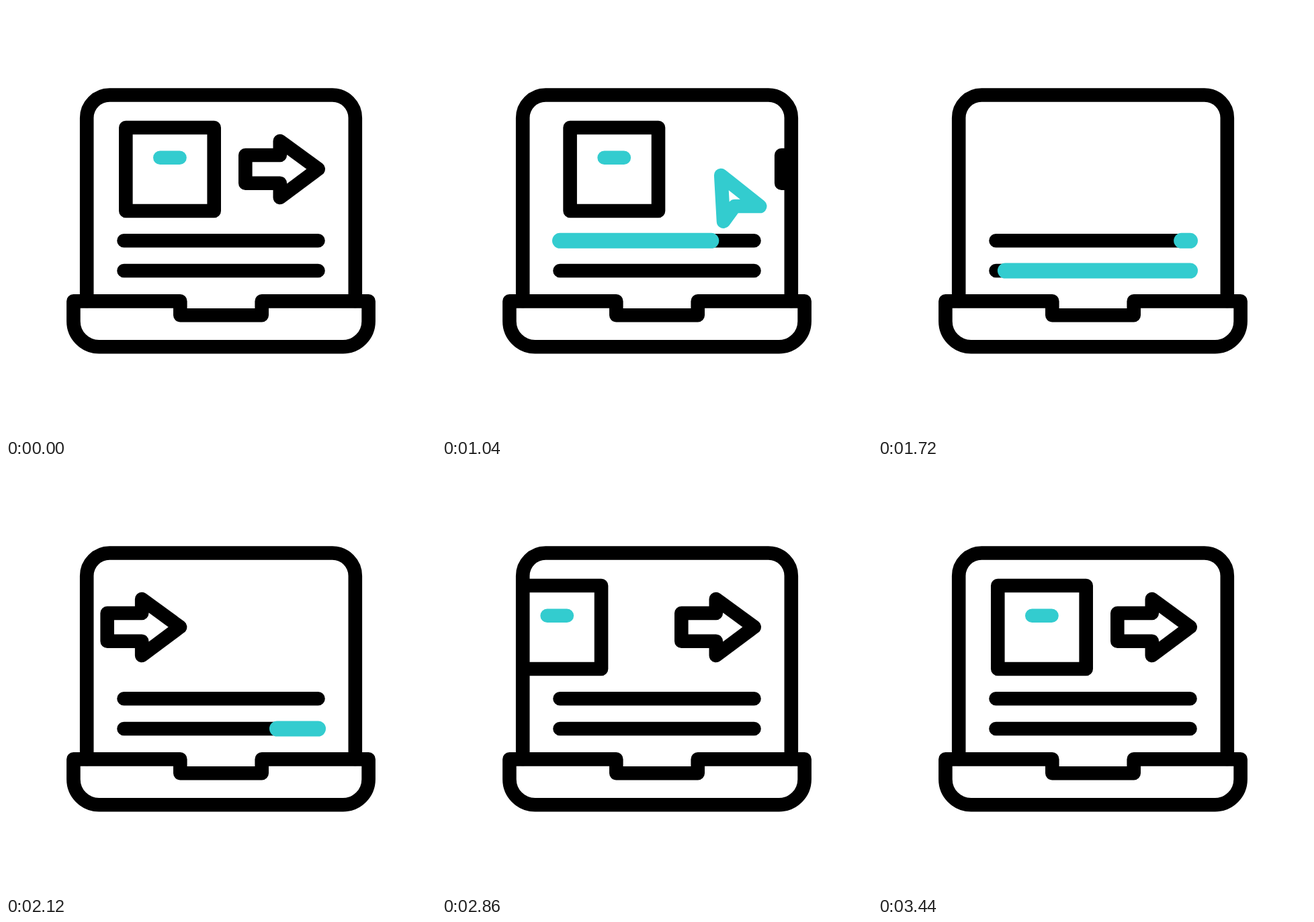
Animation, 640 px wide and 640 px high, one loop 3520 ms. Source, as an HTML page:

```html
<!DOCTYPE html>
<html lang="en">
<head>
<meta charset="utf-8">
<title>Laptop transfer</title>
<style>
  html, body { margin: 0; width: 100%; height: 100%; overflow: hidden; background: #fff; }
  svg { display: block; width: 100vw; height: 100vh; }
  path { fill: none; stroke: #000; stroke-width: 20.6; stroke-linecap: round; stroke-linejoin: round; }
  .teal { stroke: #33cccf; }
  .fill { stroke-width: 23; }
  #cursor { fill: #fff; }
</style>
</head>
<body>
<svg viewBox="0 0 640 640">
  <clipPath id="screen"><rect x="125" y="140" width="390" height="280"/></clipPath>
  <g clip-path="url(#screen)">
    <g id="square">
      <path d="M178.3 181H309.7V305H178.3Z"/>
      <path class="teal" d="M229.3 225.8H258.5"/>
    </g>
    <path id="arrow" d="M356.3 222H407.8V201L464.7 242.6L407.8 285V263.7H356.3Z"/>
  </g>
  <path d="M175.5 349.3H464.5M175.5 394H464.5"/>
  <path id="bar1" class="teal fill"/>
  <path id="bar2" class="teal fill"/>
  <path d="M120.2 439V166.5a34 34 0 0 1 34-34H485.8a34 34 0 0 1 34 34V439"/>
  <path d="M100.4 439.4H259.3V460.2H380.7V439.4H539.6V469a38 38 0 0 1-38 38.2H138.4a38 38 0 0 1-38-38.2Z"/>
  <path id="cursor" class="teal" d="M415.2 252L473.2 298H435.6L419 320.7Z"/>
</svg>
<script>
const LOOP = 3520;
const [square, arrow, bar1, bar2, cursor] =
  ['square', 'arrow', 'bar1', 'bar2', 'cursor'].map(id => document.getElementById(id));

const progress = (t, start, end) => Math.min(1, Math.max(0, (t - start) / (end - start)));
const easeInOut = p => p < .5 ? 2 * p * p : 1 - 2 * (1 - p) ** 2;

// Accelerate out to the right, then return from the left and settle.
function slide(el, t, leave, enter, enterDistance) {
  const x = t < 1700
    ? 8.4e-4 * Math.max(0, t - leave) ** 2
    : -enterDistance * (1 - progress(t, enter, enter + 960)) ** 2;
  el.setAttribute('transform', `translate(${x})`);
}

// Fill a bar from the left, then empty it the same way.
function drawBar(el, t, fill, empty) {
  const x = p => 175.5 + 289 * p;
  const from = progress(t, empty, empty + 540);
  const to = progress(t, fill, fill + 540);
  el.setAttribute('d', to > 0 && from < 1 ? `M${x(from)} 0H${x(to)}` : '');
}
bar1.setAttribute('transform', 'translate(0 349.3)');
bar2.setAttribute('transform', 'translate(0 394)');

function drawCursor(t) {
  const away = 1 - easeInOut(progress(t, 60, 440)) + easeInOut(progress(t, 1040, 1240));
  const scale = 1 - .15 * Math.sin(Math.PI * progress(t, 510, 680));
  cursor.setAttribute('transform',
    `translate(${444 + 250 * away} ${286 - 110 * away}) scale(${scale}) translate(-444 -286)`);
}

function draw(now) {
  const t = now % LOOP;
  slide(arrow, t, 620, 1900, 347);
  slide(square, t, 920, 2490, 193);
  drawBar(bar1, t, 620, 1205);
  drawBar(bar2, t, 1130, 1725 - 30);
  drawCursor(t);
  requestAnimationFrame(draw);
}
draw(0);
</script>
</body>
</html>
```
